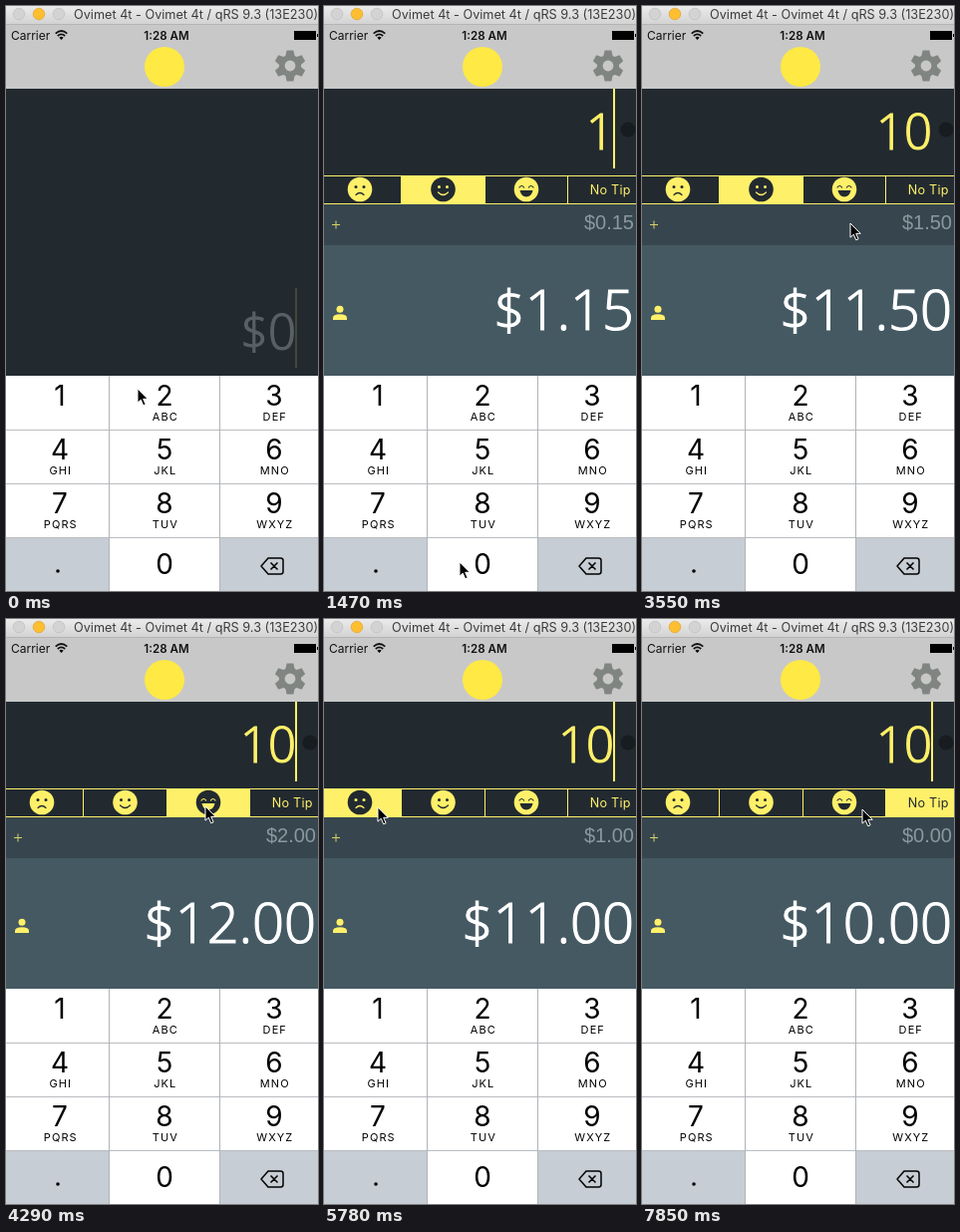
An HTML page that plays this animation: 313x587 px, repeating every 8000 ms.

```html
<!DOCTYPE html>
<html lang="en">
<head>
<meta charset="utf-8">
<style>
  html, body { margin: 0; width: 100%; height: 100%; overflow: hidden; background: #222a30; }
  svg { display: block; width: 313px; height: 587px; }
  text { font-family: Inter, "Liberation Sans", sans-serif; white-space: pre; }
  .mid { text-anchor: middle; }
  .end { text-anchor: end; }
  .money { font-family: "Open Sans", "Noto Sans", sans-serif; font-weight: 300; stroke-width: 1.2; }
  .tip { font-family: "Liberation Sans", sans-serif; }
</style>
</head>
<body>
<svg id="stage" viewBox="0 0 313 587"></svg>
<script>
const DARK = '#222a30', YELLOW = '#fff069', LOOP = 8000;
const TYPED = 870;
const rect = (x, y, w, h, fill) => `<rect x="${x}" y="${y}" width="${w}" height="${h}" fill="${fill}"/>`;
const circle = (x, y, r, fill) => `<circle cx="${x}" cy="${y}" r="${r}" fill="${fill}"/>`;
const text = (x, y, size, str, fill, attrs = '') =>
  `<text x="${x}" y="${y}" font-size="${size}" fill="${fill}" ${attrs}>${str}</text>`;
const money = (id, x, y, size, fill, str = '') =>
  text(x, y, size, str, fill, `id="${id}" class="money end" stroke="${fill}"`);

const eyes = circle(-4, -2.5, 1.5, 'INK') + circle(4, -2.5, 1.5, 'INK');
const line = d => `<path d="${d}" fill="none" stroke="INK" stroke-width="1.2" stroke-linecap="round"/>`;
const faces = [
  eyes + line('M-4 5.5Q0 1.5 4 5.5'),
  eyes + line('M-5 3Q0 8 5 3'),
  line('M-7 -2Q-4.7 -5 -2.4 -2M2.4 -2Q4.7 -5 7 -2') + '<path d="M-6.5 1H6.5Q5 7.5 0 7.5T-6.5 1Z" fill="INK"/>'
];
const edges = [0, 78, 162, 245, 313];

function segment(i, ink, back) {
  const x = edges[i], w = edges[i + 1] - x;
  const label = i < 3
    ? `<g transform="translate(${[36, 119.5, 203][i]} 184)">${circle(0, 0, 12.3, ink)}${faces[i].replaceAll('INK', back)}</g>`
    : text(287.2, 189, 12.6, 'No Tip', ink, 'class="mid" letter-spacing=".25"');
  return rect(x, 171, w, 27, back) + label;
}

function titleBar() {
  const tooth = a => `<path d="M-3.4 -15.5H3.4L5 -8H-5Z" transform="rotate(${a})"/>`;
  return `<linearGradient id="bar" x2="0" y2="1"><stop stop-color="#ebebeb"/><stop offset="1" stop-color="#d3d3d3"/></linearGradient>`
    + rect(0, 0, 313, 18, 'url(#bar)') + rect(0, 18, 313, 65, '#c8c8c8') + rect(0, 18, 313, 1, '#b4b4b4')
    + [13, 33, 53].map((x, i) => `<circle cx="${x}" cy="8" r="5.8" fill="${i == 1 ? '#fdbe30' : '#d3d3d3'}" stroke="${i == 1 ? '#dea236' : '#bdbdbd'}" stroke-width=".7"/>`).join('')
    + text(68, 13, 12.7, 'Ovimet 4t - Ovimet 4t / qRS 9.3 (13E230)', '#3c3c3c')
    + text(5, 33.5, 12, 'Carrier', '#111') + text(161, 33.5, 11.6, '1:28 AM', '#111', 'class="mid" font-weight="600"')
    + '<path d="M49.7 27.6Q55.5 22.4 61.3 27.6M51.8 30Q55.5 26.8 59.2 30" fill="none" stroke="#111" stroke-width="1.7"/><path d="M53.4 31.7Q55.5 30 57.6 31.7L55.5 34Z"/>'
    + rect(289, 25, 22, 9, '#000') + rect(312, 28, 1, 3, '#000')
    + circle(159, 61, 20, '#ffe944')
    + `<g transform="translate(285 60)" fill="#818581">${[0, 60, 120, 180, 240, 300].map(tooth).join('')}${circle(0, 0, 11, '#818581')}${circle(0, 0, 5.4, '#c8c8c8')}</g>`;
}

function keypad() {
  const letters = ['', 'ABC', 'DEF', 'GHI', 'JKL', 'MNO', 'PQRS', 'TUV', 'WXYZ'];
  const cols = [54, 159, 269];
  const keys = letters.map((s, i) => {
    const x = cols[i % 3], y = 371 + 54 * Math.floor(i / 3);
    return text(x, y + 30, 28, i + 1, '#000', 'class="mid"')
      + text(x + .8, y + 45, 11, s, '#000', 'class="mid" letter-spacing="1.1"');
  });
  return rect(0, 371, 313, 216, '#fff') + rect(0, 533, 103, 54, '#c7cdd4') + rect(215, 533, 98, 54, '#c7cdd4')
    + [425, 479, 533].map(y => rect(0, y, 313, 1, '#b9bcc0')).join('')
    + [103, 214].map(x => rect(x, 371, 1, 216, '#b0b3b7')).join('')
    + keys.join('') + text(159, 570, 28, '0', '#000', 'class="mid"') + circle(52, 567, 1.8, '#000')
    + '<path d="M263 554H275.5Q278 554 278 556.5V567.5Q278 570 275.5 570H263L256 562ZM265.5 558.5L272.5 565.5M272.5 558.5L265.5 565.5" fill="none" stroke="#000" stroke-width="1.5" stroke-linejoin="round"/>';
}

function panel() {
  return money('bill', 291, 144, 49, YELLOW)
    + circle(305, 124, 7.5, '#171c20')
    + [0, 1, 2, 3].map(i => segment(i, YELLOW, DARK) + `<g class="on">${segment(i, DARK, YELLOW)}</g>`).join('')
    + [170, 198].map(y => rect(0, y, 313, 1, YELLOW)).join('')
    + [77, 161, 244].map(x => rect(x, 170, 1, 29, YELLOW)).join('')
    + rect(0, 199, 313, 41, '#37464e') + rect(0, 240, 313, 131, '#455963')
    + '<path d="M8 219.5H16M12 215.5V223.5" stroke="#d8d06a"/>'
    + text(311, 224, 20, '', '#8b989f', 'id="tip" class="tip end"')
    + money('total', 311, 325, 56, '#fff')
    + circle(16, 304.3, 3.5, YELLOW) + `<path d="M9 315V313Q9 309.3 16 309.3T23 313V315Z" fill="${YELLOW}"/>`;
}

const $ = id => document.getElementById(id);
$('stage').innerHTML = rect(0, 83, 313, 288, DARK)
  + money('hint', 291, 345, 49, '#596067', '$0')
  + `<g id="panel">${panel()}</g>`
  + `<rect id="caret" x="290" width="2" height="80" fill="${YELLOW}"/>`
  + keypad() + titleBar()
  + '<path id="mouse" d="M0 0V14.2L3.3 11.2L5.7 16.8L8.1 15.8L5.7 10.3H10.2Z" fill="#000" stroke="#fff" stroke-width="1"/>';
const lit = document.querySelectorAll('.on');

// time, x, y of the pointer
const route = [
  [100, 132, 384], [620, 79, 393], [890, 79, 393], [1180, 122, 542], [1340, 136, 558], [1770, 136, 558],
  [2350, 246, 214], [2500, 246, 214], [2800, 250, 218], [3050, 250, 218], [3500, 209, 218], [3560, 209, 218],
  [3800, 200, 188], [4290, 200, 188], [4800, 127, 189], [5050, 127, 189], [5400, 54, 189], [5850, 54, 189],
  [6350, 272, 190], [7050, 272, 190], [7500, 221, 191]
];
// time, selected segment, tip rate
const picks = [[0, 1, .15], [3850, 2, .2], [4950, 1, .15], [5500, 0, .1], [6415, 3, 0]];

const ramp = (t, a, b) => Math.min(1, Math.max(0, (t - a) / (b - a)));
const ease = u => (1 - Math.cos(Math.PI * u)) / 2;

function pointer(t) {
  const i = route.findIndex(p => p[0] > t);
  if (i < 0) return route.at(-1).slice(1);
  if (!i) return route[0].slice(1);
  const [a, x, y] = route[i - 1], [b, X, Y] = route[i], u = ease(ramp(t, a, b));
  return [x + (X - x) * u, y + (Y - y) * u];
}

function caretAlpha(t) {
  if (t < TYPED) return .15 + .85 * ramp(t, 20, 150);
  if (t < 2200) return 1;
  const p = t % 1000;
  return 1 - ramp(p, 300, 430) + ramp(p, 620, 780);
}

function draw(t) {
  const typed = t >= TYPED;
  const drop = 280 * (1 - ease(ramp(t, 890, 1180)));
  const bill = t < 1700 ? 1 : 10;
  const n = picks.findLastIndex(p => p[0] <= t);
  const [start, chosen, rate] = picks[n];
  const fade = n ? ramp(t, start, start + 250) : 1;

  $('hint').style.display = typed ? 'none' : '';
  $('panel').style.display = typed ? '' : 'none';
  $('panel').setAttribute('transform', `translate(0 ${drop})`);
  $('caret').setAttribute('y', typed ? 83 + drop : 283);
  $('caret').setAttribute('opacity', caretAlpha(t));
  $('bill').textContent = bill;
  $('tip').textContent = '$' + (bill * rate).toFixed(2);
  $('total').textContent = '$' + (bill * (1 + rate)).toFixed(2);
  lit.forEach((g, i) => {
    const a = i == chosen ? fade : n && i == picks[n - 1][1] ? 1 - fade ** 1.5 : 0;
    g.setAttribute('opacity', a);
  });
  $('mouse').setAttribute('transform', `translate(${pointer(t)})`);
}

const begin = performance.now();
function tick() {
  draw((performance.now() - begin) % LOOP);
  requestAnimationFrame(tick);
}
tick();
</script>
</body>
</html>
```
